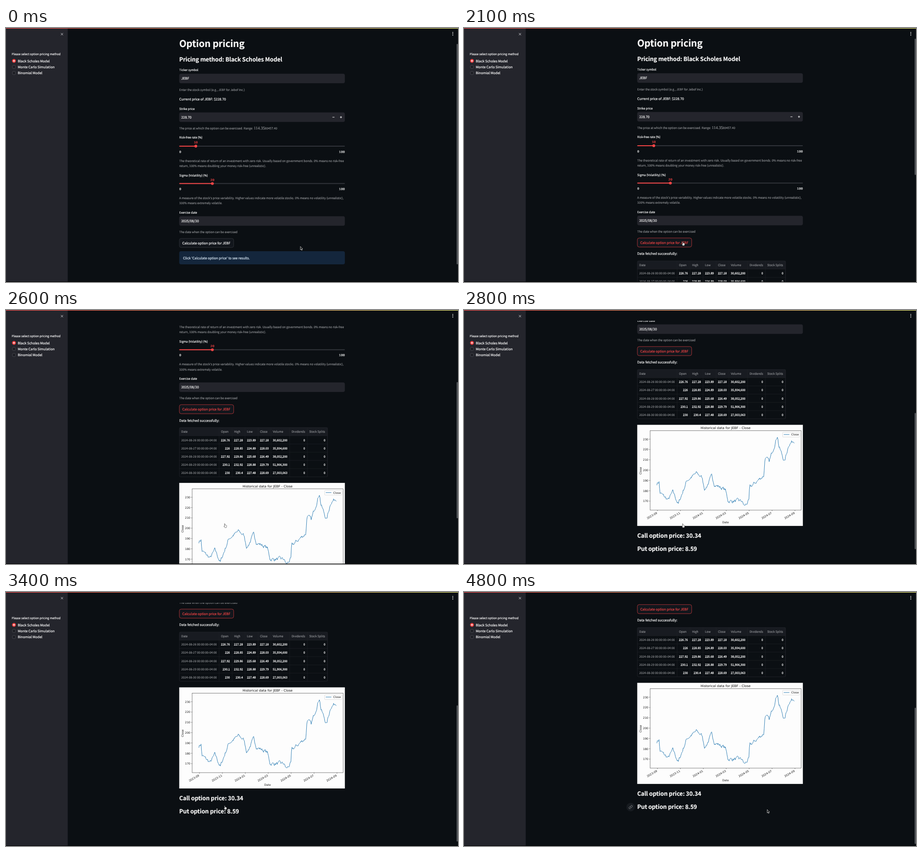
An HTML page that plays this animation: 998 by 561 pixels, repeating every 5.2 s.

```html
<!DOCTYPE html>
<html lang="en">
<head>
<meta charset="utf-8">
<title>Option pricing</title>
<style>
  html, body { margin: 0; width: 100%; height: 100%; overflow: hidden; background: #0b0f13; }
  svg { display: block; width: 998px; height: 561px; }
  text {
    font-family: "Noto Sans CJK JP", "Noto Sans CJK SC", "Noto Sans CJK", "Open Sans", sans-serif;
    color: #fafafa; fill: currentColor; stroke: currentColor; stroke-width: .2px;
    text-rendering: geometricPrecision; white-space: pre;
  }
  .muted { color: #9b9da0; stroke-width: .12px; }
  .math { font-family: "Liberation Serif", serif; font-size: 9.2px; }
  .mono { font-family: "Liberation Mono", monospace; }
  .plot text { font-family: "DejaVu Sans", sans-serif; color: #111; stroke: none; }
  .bold { font-weight: 700; letter-spacing: -.006em; }
  .cell { stroke-width: .28px; }
  .end { text-anchor: end; }
  .mid { text-anchor: middle; }
  .red { color: #f94546; }
  #info text { color: #dcebf8; }
  #button rect { fill: #12161c; stroke: #3d4045; stroke-width: .7px; }
  #button.active rect { stroke: #f04344; }
  #button.active text { color: #f04344; }
</style>
</head>
<body>
<svg id="stage" viewBox="0 0 998 561"></svg>
<script>
const TICKER = 'JEBF', LEFT = 382.5, RIGHT = 748.2;
const RED = '#f94546', PANEL = '#24252c', BACK = '#0b0f13', LINE = '#2f7fb5';
const BODY = 8.3, SMALL = 7.25;
const EM = 1 / 1.117; // the Latin glyphs of this face are drawn 11.7% oversize

const raw = (x, y, str, size, cls = '', more = '') =>
  `<text x="${x}" y="${y}" font-size="${size}" class="${cls}" ${more}>${str}</text>`;
const text = (x, y, str, size = BODY, cls = '') => raw(x, y, str, size * EM, cls);
const rect = (x, y, w, h, fill, more = '') =>
  `<rect x="${x}" y="${y}" width="${w}" height="${h}" fill="${fill}" ${more}/>`;
const dot = (x, y, r, fill, more = '') => `<circle cx="${x}" cy="${y}" r="${r}" fill="${fill}" ${more}/>`;
const path = (d, stroke, width, more = '') =>
  `<path d="${d}" fill="none" stroke="${stroke}" stroke-width="${width}" ${more}/>`;

const label = (y, str) => text(LEFT, y + 2.5, str, SMALL);
const caption = (y, ...lines) =>
  lines.map((line, i) => text(LEFT, y + 2.5 + i * 11.3, line, SMALL, 'muted')).join('');
const field = (y, value) =>
  rect(LEFT, y - 10.5, RIGHT - LEFT, 21, PANEL, 'rx="4"') + text(387, y + 2.9, value);
const heading = (y, str) => text(LEFT, y + 4.8, str, 14.2, 'bold');

function slider(y, percent) {
  const x = LEFT + (RIGHT - LEFT) * percent / 100;
  return rect(LEFT, y - 1, RIGHT - LEFT, 2, '#32353b', 'rx="1"') +
    rect(LEFT, y - 1, x - LEFT, 2, RED, 'rx="1"') + dot(x, y, 3.1, RED) +
    raw(x, y - 6, percent, 7.3, 'mono mid red') +
    raw(LEFT, y + 14.6, 0, 7.3, 'mono') + raw(RIGHT, y + 14.6, 100, 7.3, 'mono end');
}

function form() {
  return text(LEFT, 42, 'Option pricing', 23.1, 'bold') +
    heading(69.5, 'Pricing method: Black Scholes Model') +
    label(92.5, 'Ticker symbol') + field(111.5, TICKER) +
    caption(136.5, `Enter the stock symbol (e.g., ${TICKER} for Jebof Inc.)`) +
    text(LEFT, 159.6, `Current price of ${TICKER}: $228.70`) +
    label(178.5, 'Strike price') + field(197, '228.70') +
    path('M720.7 197h4.6M737.3 197h4.6M739.6 194.7v4.6', '#fafafa', 1.1) +
    caption(221.5, 'The price at which the option can be exercised. Range: ' +
      '<tspan class="math">114.35<tspan font-style="italic">to</tspan></tspan>457.40') +
    label(241.5, 'Risk-free rate (%)') + slider(260.9, 10) +
    caption(293, 'The theoretical rate of return of an investment with zero risk. Usually based on government bonds. 0% means no risk-free',
      'return, 100% means doubling your money risk-free (unrealistic).') +
    label(325, 'Sigma (Volatility) (%)') + slider(343.5, 20) +
    caption(375.5, "A measure of the stock's price variability. Higher values indicate more volatile stocks. 0% means no volatility (unrealistic),",
      '100% means extremely volatile.') +
    label(407.5, 'Exercise date') + field(426.2, '2025/08/30') +
    caption(450.5, 'The date when the option can be exercised') +
    `<g id="button">${rect(382.8, 464.8, 119.9, 20, '', 'rx="4"')}
      ${text(389.3, 477.7, `Calculate option price for ${TICKER}`)}</g>` +
    `<g id="info">${rect(LEFT, 493, RIGHT - LEFT, 29, '#14263c', 'rx="4"')}
      ${text(391, 510.9, "Click 'Calculate option price' to see results.")}</g>`;
}

function table() {
  const columns = { Date: 87.8, Open: 28.6, High: 28.7, Low: 28.6, Close: 28.5, Volume: 41.2, Dividends: 39, 'Stock Splits': 44.6 };
  const rows = [
    '226.76 227.28 223.89 227.18 30,602,200',
    '226 228.85 224.89 228.03 35,934,600',
    '227.92 229.86 225.68 226.49 38,052,200',
    '230.1 232.92 228.88 229.79 51,906,300',
    '230 230.4 227.48 228.69 27,003,063'].map((row, i) =>
      [`2024-08-${26 + i} 00:00:00-04:00`, ...row.split(' '), 0, 0]);
  const x0 = 382.8, width = 327, top = 515.4, step = 18.15, height = step * 6;
  let out = rect(x0, top, width, step, '#181b21'), lines = '', x = x0;
  Object.entries(columns).forEach(([name, w], c) => {
    out += text(x + 4.2, top + 11.6, name, SMALL, 'muted');
    rows.forEach((row, r) => {
      const y = top + 29.9 + r * step;
      out += c ? text(x + w - 4.8, y, row[c], SMALL, 'cell end') : text(x + 4.2, y, row[c], SMALL, 'muted');
    });
    x += w;
    lines += `M${x} ${top}v${height}`;
  });
  for (let i = 1; i < 6; i++) lines += `M${x0} ${top + i * step}h${width}`;
  return out + path(lines, '#22252b', .6) +
    rect(x0, top, width, height, 'none', 'rx="3" stroke="#2a2d33" stroke-width=".6"');
}

// value of a list of [position, value, easing] keys
function track(keys, at) {
  const i = keys.findIndex(key => key[0] > at);
  if (i === 0) return keys[0][1];
  if (i < 0) return keys[keys.length - 1][1];
  const [from, a] = keys[i - 1], [to, b, easing = u => u] = keys[i];
  return a + (b - a) * easing((at - from) / (to - from));
}

// turning points of the price, [day, price]; seeded noise fills in the days between
const trend = [[0, 187], [6, 189], [8, 178], [30, 171], [43, 179], [57, 167], [80, 190], [106, 197], [120, 193],
  [128, 181], [146, 194], [154, 186], [182, 181], [190, 170], [226, 170], [233, 165], [245, 170], [247, 183],
  [285, 195], [288, 213], [299, 208], [321, 234], [325, 223], [340, 208], [351, 225], [366, 229]];

function closes() {
  let seed = 7, noise = 0;
  const random = () => (seed = seed * 16807 % 2147483647) / 2147483647;
  return Array.from({ length: 252 }, (_, i) => {
    const day = i * 366 / 251;
    noise = noise * .6 + (random() - .5) * 3.2;
    return [day, track(trend, day) + noise];
  });
}

function chart() {
  const priceY = p => 285.3 + (230 - p) * 2.279;
  let ticks = '', labels = '';
  for (let p = 170; p <= 230; p += 10) {
    ticks += `M411 ${priceY(p)}h-2.1`;
    labels += raw(407, priceY(p) + 2.3, p, 6.1, 'end');
  }
  for (let i = 0; i < 7; i++) {
    const x = 427.2 + i * 50.6, month = new Date(Date.UTC(2023, 8 + 2 * i)).toISOString().slice(0, 7);
    ticks += `M${x} 442v2.1`;
    labels += raw(0, 0, month, 6.1, 'end', `transform="translate(${x} 449.6) rotate(-30)"`);
  }
  const line = closes().map(([day, p]) => `${425.8 + .8295 * day},${priceY(p)}`).join('L');
  return `<g class="plot">` + rect(LEFT, 253.6, RIGHT - LEFT, 223.3, '#fdfdfd') +
    path('M' + line, LINE, 1, 'stroke-linejoin="round"') +
    rect(411, 266.7, 333.5, 175.3, 'none', 'stroke="#111" stroke-width=".55"') +
    path(ticks, '#111', .55) + labels +
    raw(577.5, 263.4, `Historical data for ${TICKER} - Close`, 7.3, 'mid') +
    raw(577.5, 471.4, 'Date', 6.1, 'mid') +
    raw(0, 0, 'Close', 6.1, 'mid', 'transform="translate(391.8 355) rotate(-90)"') +
    rect(703.6, 270, 38, 10.6, '#fdfdfd', 'rx="1.2" stroke="#ccc" stroke-width=".6"') +
    path('M706 275h12.4', LINE, 1) + raw(722.6, 277.3, 'Close', 6.1) + '</g>';
}

function results() {
  return text(LEFT, 502.4, 'Data fetched successfully:') + table() +
    `<g transform="translate(0 384)">${chart()}
      ${heading(498, 'Call option price: 30.34')}${heading(527.5, 'Put option price: 8.59')}</g>
    <g id="link">${dot(368, 912, 9.4, '#171b20')}
      <g transform="translate(363.2 907.2) scale(.4)">${path(
        'M10 13a5 5 0 0 0 7.5.5l3-3a5 5 0 0 0-7-7l-1.7 1.7M14 11a5 5 0 0 0-7.5-.5l-3 3a5 5 0 0 0 7 7l1.7-1.7',
        '#9b9da0', 2, 'stroke-linecap="round"')}</g></g>`;
}

function sidebar() {
  let out = rect(0, 0, 136.3, 560, PANEL) + path('M121.2 11.2l4.8 4.8m0-4.8l-4.8 4.8', '#e8e8ea', .9) +
    text(12.5, 59.6, 'Please select option pricing method', SMALL);
  ['Black Scholes Model', 'Monte Carlo Simulation', 'Binomial Model'].forEach((name, i) => {
    const y = 72.6 + i * 13.4;
    out += (i ? dot(17.6, y, 3.8, '#1d1e24', 'stroke="#5b5c62" stroke-width=".7"')
              : dot(17.6, y, 4.2, RED) + dot(17.6, y, 1.6, '#fff')) + text(26, y + 2.9, name);
  });
  return out;
}

document.getElementById('stage').innerHTML =
  `<defs><linearGradient id="strip"><stop stop-color="#ff4b4b"/><stop offset="1" stop-color="#fffd80"/></linearGradient></defs>` +
  rect(0, 0, 998, 561, BACK) +
  `<g id="page">${form()}<g id="results">${results()}</g></g>` +
  rect(136, 0, 862, 23.8, BACK) + sidebar() +
  [-3.1, 0, 3.1].map(dy => dot(986.5, 12.8 + dy, .95, '#fafafa')).join('') +
  rect(994.8, 35, 3.2, 487, '#515357', 'id="thumb" rx="1.6"') +
  rect(0, 0, 998, 1.1, 'url(#strip)') + rect(0, 560, 998, 1, '#000') +
  `<g id="cursor">
    <path id="arrow" d="M0 0V7.3L1.7 5.8 2.9 8.4 4 7.9 2.8 5.4H5.1Z" fill="#000" stroke="#fff" stroke-width=".7"/>
    <path id="hand" d="M-.1 0q.9-.6 1.2.5l.3 2.4 2.6.6q1 .3.9 1.4l-.5 2.5-.4 1.3h-3.3l-2-2.8q-.2-.9.8-.6l.9.6-.6-4.6z"
      fill="#fff" stroke="#000" stroke-width=".5"/>
  </g>`;

const $ = id => document.getElementById(id);
const show = (id, on) => $(id).setAttribute('display', on ? 'inline' : 'none');
const easeIn = u => u * u;
const easeOut = u => u * (2 - u);
const easeInOut = u => u * u * (3 - 2 * u);

// two flicks of the wheel
const scrollKeys = [[2000, 0], [2100, 1], [2400, 127.5, easeIn], [2800, 384], [2900, 390],
  [3100, 391], [3400, 427, easeInOut], [3600, 437, easeOut]];
const cursorX = [[300, 650], [1000, 482.4, easeInOut], [3600, 482.4], [4100, 669.5, easeInOut]];
const cursorY = [[300, 482.6], [1000, 472, easeInOut], [3600, 472], [4100, 480.6, easeInOut]];

function draw() {
  const t = Math.floor(performance.now() % 5200 / 100) * 100;
  const scroll = track(scrollKeys, t), x = track(cursorX, t), y = track(cursorY, t);
  const calculated = t >= 1600, hovered = x < 502, leaving = t > 3600;

  $('page').setAttribute('transform', `translate(0 ${-scroll})`);
  $('thumb').setAttribute('y', calculated ? 23.5 + .532 * (scroll - 1) : 35);
  $('thumb').setAttribute('height', calculated ? 301 : 487);
  $('button').setAttribute('class', hovered || calculated ? 'active' : '');
  show('info', !calculated);
  show('results', calculated);
  show('link', leaving);
  show('hand', hovered && !leaving);
  show('arrow', !hovered || leaving);
  $('cursor').setAttribute('transform', `translate(${x} ${y})`);
  requestAnimationFrame(draw);
}
draw();
</script>
</body>
</html>
```
